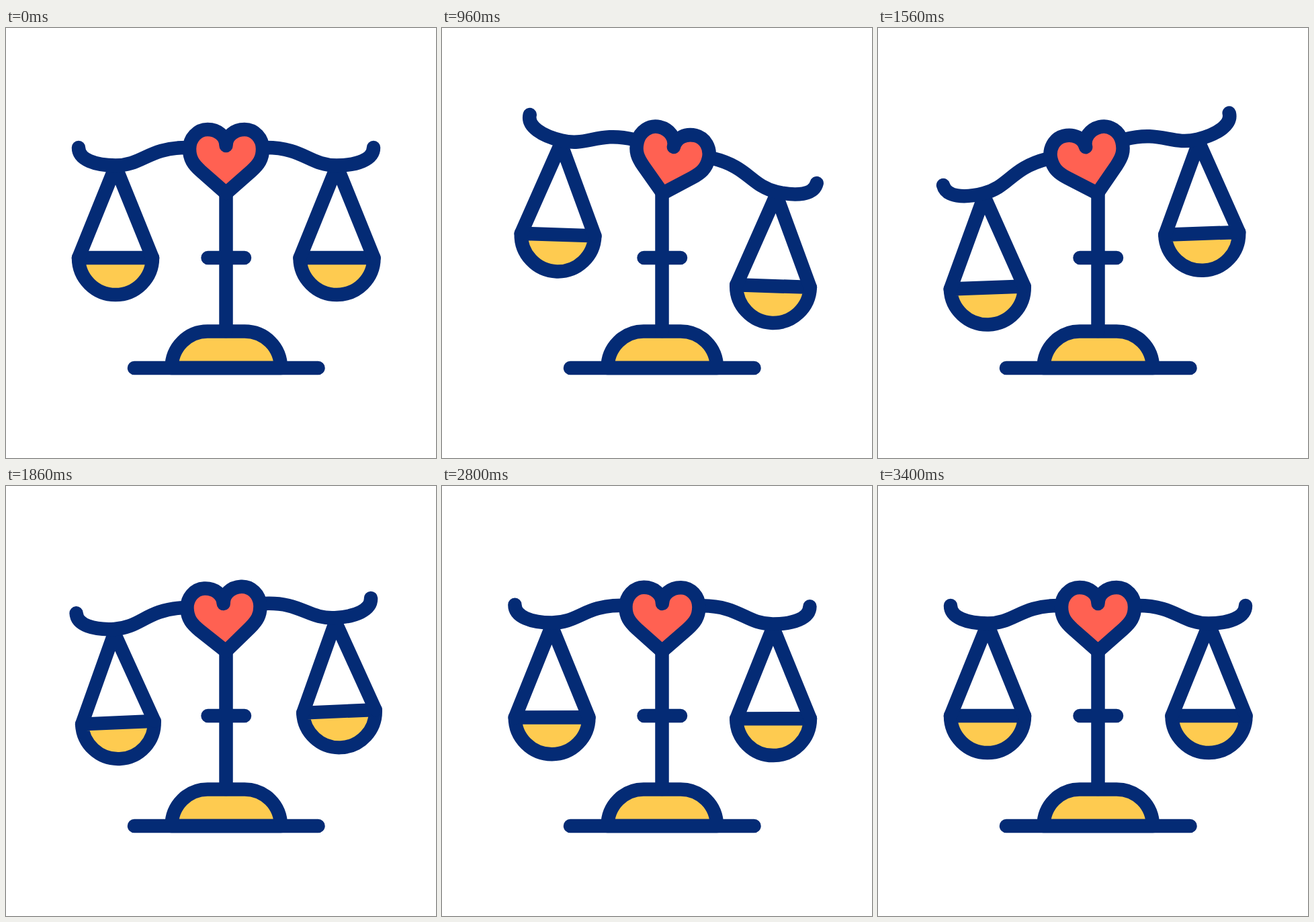
Animation, 640 px wide and 640 px high, one loop 3.62 s. Source, as an HTML page:

```html
<!DOCTYPE html>
<html lang="en">
<head>
<meta charset="utf-8">
<title>Balance scale</title>
<style>
  html, body { margin: 0; width: 100%; height: 100%; overflow: hidden; background: #fff; }
  svg { display: block; width: 100%; height: 100%; }
  .ink { fill: none; stroke: #042b75; stroke-width: 20.5; stroke-linecap: round; stroke-linejoin: round; }
  .ink path { vector-effect: non-scaling-stroke; }
  .gold { fill: #fecb50; }
  .red { fill: #ff6152; }
</style>
</head>
<body>
<svg viewBox="0 0 640 640">
  <defs>
    <g id="pan">
      <path class="gold" d="M-55 0A55 55 0 0 0 55 0Z"/>
      <path d="M-55 0L0 -136L55 0"/>
    </g>
    <path id="arm" d="M108 178C108 196 133 204.5 163 204.5C203 204.5 212 178 268 178"/>
  </defs>
  <g class="ink">
    <path class="gold" d="M246.5 506C246.5 475 271 451.5 300 451.5H355C385 451.5 409 475 409 506Z"/>
    <path d="M191 506H464.5M300.5 342H355M327.5 246V451"/>
    <g id="beam">
      <use href="#pan" class="hanger"/>
      <use href="#pan" class="hanger"/>
      <use href="#arm"/>
      <use href="#arm" transform="matrix(-1 0 0 1 655 0)"/>
      <path class="red" d="M327.5 175C327.5 161 315 151 300 151C285 151 273 164 273 180C273 195 279 203 290 213L327.5 246L365 213C376 203 382 195 382 180C382 164 370 151 355 151C340 151 327.5 161 327.5 175Z"/>
    </g>
  </g>
</svg>
<script>
const LOOP = 3620, STEP = 20;
const PAN_X = [163, 492.5], PAN_Y = 342, HANG = 136;

// time, beam angle, pan angle relative to the beam, pan drop
const KEYS = [
  [212, 0, 0, 0],
  [810, 14.2, -12.2, 0],
  [1537, -14.2, 12.2, 0],
  [2055, 7, -9.8, 3.5],
  [2545, -7, 5.6, 3.5],
  [2920, 3.5, -3.1, 3.2],
  [3170, -3.5, 2.5, 2],
  [3400, 0, 0, 0]
];

const beam = document.getElementById('beam');
const hangers = document.querySelectorAll('.hanger');
const rad = deg => deg * Math.PI / 180;
const lerp = (a, b, u) => a + (b - a) * u;

// cubic-bezier(.8, 0, .5, 1)
function ease(x) {
  let lo = 0, hi = 1;
  for (let i = 0; i < 24; i++) {
    const s = (lo + hi) / 2, r = 1 - s;
    if (2.4 * r * r * s + 1.5 * r * s * s + s * s * s < x) lo = s; else hi = s;
  }
  return lo * lo * (3 - 2 * lo);
}

function draw(time) {
  const t = Math.max(KEYS[0][0], Math.min(time, KEYS[KEYS.length - 1][0]));
  const i = Math.max(1, KEYS.findIndex(key => t <= key[0]));
  const [t0, beam0, pan0, drop0] = KEYS[i - 1];
  const [t1, beam1, pan1, drop1] = KEYS[i];
  const u = t >= t1 ? 1 : t <= t0 ? 0 : ease((t - t0) / (t1 - t0));

  // Pan outlines blend point by point, so they shrink a little between poses.
  const cos = lerp(Math.cos(rad(pan0)), Math.cos(rad(pan1)), u);
  const sin = lerp(Math.sin(rad(pan0)), Math.sin(rad(pan1)), u);
  const y = PAN_Y + lerp(drop0, drop1, u);

  beam.setAttribute('transform', `rotate(${lerp(beam0, beam1, u)} 327.5 250)`);
  hangers.forEach((hanger, n) => hanger.setAttribute('transform',
    `matrix(${cos} ${sin} ${-sin} ${cos} ${PAN_X[n] - HANG * sin} ${y})`));
}

const start = performance.now();
function tick() {
  const time = (performance.now() - start) % LOOP;
  draw(Math.floor(time / STEP) * STEP);
  requestAnimationFrame(tick);
}
draw(0);
requestAnimationFrame(tick);
</script>
</body>
</html>
```
